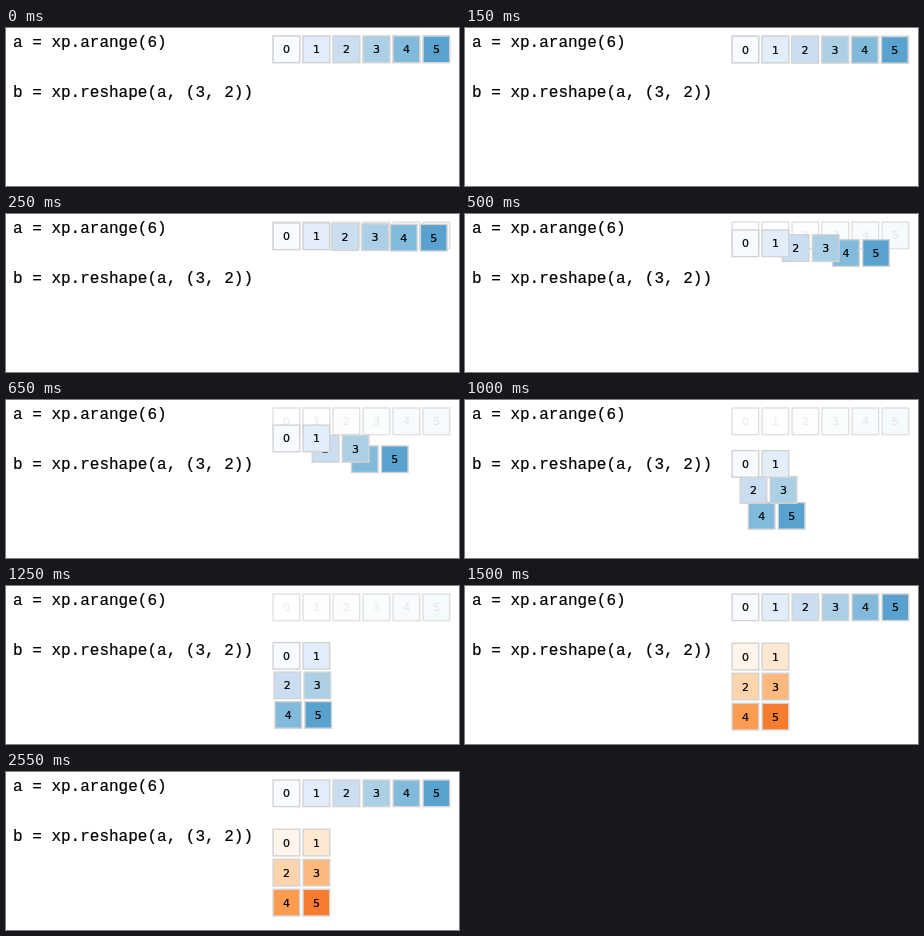
Write an HTML page that moves like this. It is 453x158 px and loops after 3.25 s.

```html
<!DOCTYPE html>
<html lang="en">
<head>
<meta charset="utf-8">
<title>Reshape</title>
<style>
  html, body { margin: 0; width: 100%; height: 100%; overflow: hidden; background: #fff; }
  svg { display: block; }
  text { white-space: pre; stroke: #000; stroke-width: .2px; }
  .code { font: 16px "Liberation Mono", "Courier New", monospace; }
  .cell text { font: 11px "DejaVu Sans", sans-serif; text-anchor: middle; }
  .cell rect { stroke: #d3d3d3; stroke-width: 1.4px; }
  .faded rect { fill-opacity: .06; stroke: #e0e0e0; }
  .faded text { opacity: .07; }
</style>
</head>
<body>
<svg width="453" height="158" viewBox="0 0 453 158">
  <text class="code" x="7" y="19">a = xp.arange(6)</text>
  <text class="code" x="7" y="69">b = xp.reshape(a, (3, 2))</text>
  <g id="row"></g>
  <g id="grid"></g>
</svg>
<script>
const LOOP = 3250, MOVE = 1500, LEAD = 15;
const PITCH = 30, LEFT = 280.4, ROW_Y = 21.3, GRID_Y = 70.6;
const blues = ["#f7fbff", "#e1edf8", "#cbdef1", "#abd0e6", "#81badb", "#59a1cf"];
const oranges = ["#fff5eb", "#fee8d2", "#fdd4ab", "#fdb87d", "#fc9c51", "#f67d2e"];

const row = document.getElementById("row");
const grid = document.getElementById("grid");

function addCell(parent, value) {
  const cell = document.createElementNS("http://www.w3.org/2000/svg", "g");
  cell.setAttribute("class", "cell");
  cell.innerHTML =
    `<rect x="-13.3" y="-13.3" width="26.6" height="26.6" fill="${blues[value]}"/>` +
    `<text y="4">${value}</text>`;
  parent.append(cell);
  return cell;
}

function place(cell, x, y) {
  cell.setAttribute("transform", `translate(${x} ${y})`);
}

const easeCubic = p => p < .5 ? 4 * p ** 3 : 1 - 4 * (1 - p) ** 3;
const mix = (a, b, p) => a + (b - a) * p;

blues.forEach((_, i) => place(addCell(row, i), LEFT + PITCH * i, ROW_Y));

// Lower values are painted last, so they lie on top.
const movers = [5, 4, 3, 2, 1, 0].map(value => ({ value, cell: addCell(grid, value) }));

function draw(time) {
  const t = time % LOOP;
  const done = t >= MOVE;
  const p = done ? 1 : easeCubic(Math.min(1, (t + LEAD) / MOVE));
  row.setAttribute("class", done ? "" : "faded");
  for (const { value, cell } of movers) {
    const x = LEFT + PITCH * mix(value, value % 2, p);
    const y = mix(ROW_Y, GRID_Y + PITCH * Math.floor(value / 2), p);
    place(cell, x, y);
    cell.firstChild.setAttribute("fill", (done ? oranges : blues)[value]);
  }
}

let start;
function tick(now) {
  start ??= now;
  draw(now - start);
  requestAnimationFrame(tick);
}
draw(0);
requestAnimationFrame(tick);
</script>
</body>
</html>
```
